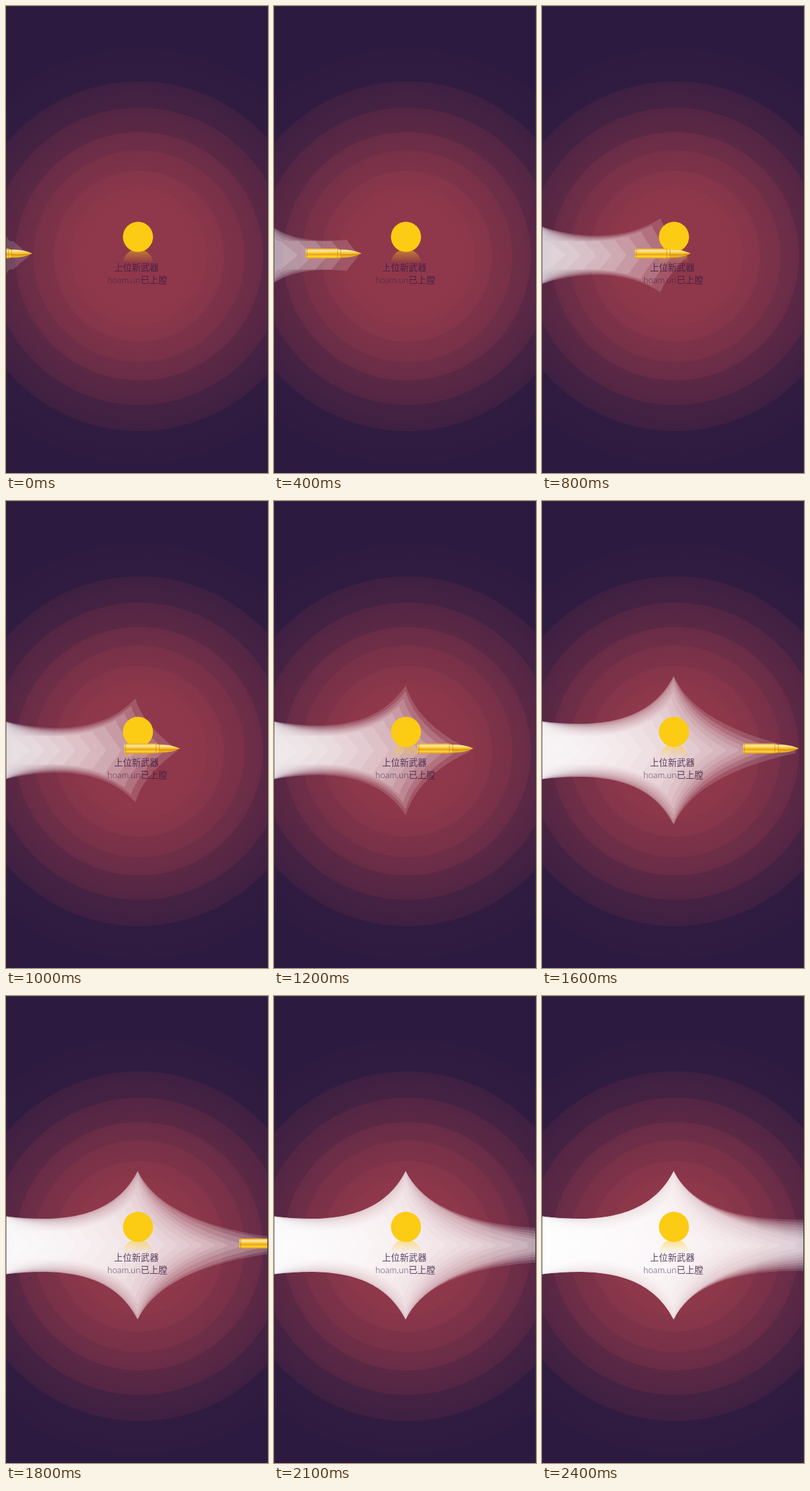
Animation, 400 px wide and 711 px high, one loop 2.7 s. Source, as an HTML page:

```html
<!DOCTYPE html>
<html lang="zh-CN">
<head>
<meta charset="utf-8">
<title>上位新武器</title>
<style>
  html, body { margin: 0; height: 100%; overflow: hidden; background: #2c1a40; }
  svg { display: block; width: 100vw; height: 100vh; }
  text {
    font: 300 13.6px Lato, "Noto Sans CJK SC Light", "Noto Sans CJK SC", "Noto Sans CJK", sans-serif;
    fill: #3b1c42;
    fill-opacity: .82;
    text-anchor: middle;
  }
</style>
</head>
<body>
<svg viewBox="0 0 400 711" preserveAspectRatio="xMidYMid slice">
  <defs>
    <radialGradient id="glow" gradientUnits="userSpaceOnUse" cx="203" cy="381" r="430"></radialGradient>
    <linearGradient id="gold" x2="0" y2="1">
      <stop offset="0" stop-color="#f0ae1c"/>
      <stop offset=".22" stop-color="#ffeaa4"/>
      <stop offset=".45" stop-color="#f8c838"/>
      <stop offset=".62" stop-color="#eba414"/>
      <stop offset=".8" stop-color="#ffd63c"/>
      <stop offset="1" stop-color="#e89c08"/>
    </linearGradient>
    <linearGradient id="mirror" gradientUnits="userSpaceOnUse" x1="0" y1="374" x2="0" y2="391">
      <stop offset="0" stop-color="#fcc81a" stop-opacity=".42"/>
      <stop offset="1" stop-color="#fcc81a" stop-opacity="0"/>
    </linearGradient>
  </defs>

  <rect width="400" height="711" fill="url(#glow)"/>
  <g id="trail" fill="#fff" fill-opacity=".155"></g>

  <path d="M178.5 393A23 23 0 0 1 224.5 393Z" fill="url(#mirror)"/>
  <circle cx="201.5" cy="351.5" r="23" fill="#fccb14"/>
  <text x="199" y="403">上位新武器</text>
  <text x="200.5" y="422">hoam.un已上膛</text>

  <!-- drawn with its point at the origin -->
  <g id="bullet">
    <path d="M-85 -7.5H-37L-33 -6H-30C-18 -6 -8 -3.5 0 0C-8 4 -18 6.5 -30 6.5H-33L-37 7.5H-85Z" fill="url(#gold)"/>
    <path d="M-83 -7.5V7.5M-36.5 -7V7M-31.5 -6V6.5" stroke="#b87408" stroke-opacity=".55"/>
    <path d="M-31 1C-20 2 -10 1 0 0C-8 4 -18 6.5 -31 6.5Z" fill="#b86c05" fill-opacity=".3"/>
  </g>
  <path d="M0 711V.5H399.5V711" fill="none" stroke="#3b3336" stroke-width="1"/>
</svg>

<script>
const $ = id => document.getElementById(id);
const NS = "http://www.w3.org/2000/svg";
const make = (parent, tag, attrs) => {
  const el = parent.appendChild(document.createElementNS(NS, tag));
  for (const key in attrs) el.setAttribute(key, attrs[key]);
  return el;
};
const clamp = v => Math.min(1, Math.max(0, v));
const lerp = (a, b, f) => a + (b - a) * f;
const smooth = v => { v = clamp(v); return v * v * (3 - 2 * v); };

// Background: crimson fading to violet, stepped into rings
const crimson = [144, 56, 75], violet = [44, 26, 64];
const shade = r => {
  const f = smooth((r - 80) / 265);
  return `rgb(${crimson.map((c, i) => Math.round(lerp(c, violet[i], f)))})`;
};
let inner = 0;
for (const r of [80, 104, 130, 161, 189, 226, 266, 316, 430]) {
  make($("glow"), "stop", { offset: inner / 430, "stop-color": shade(r - 8) });
  make($("glow"), "stop", { offset: r / 430, "stop-color": shade(r + 4) });
  inner = r;
}

const STEP = 100, LAST = 24, LOOP = 2700, AXIS = 379.5;

// Bullet point: even flight that slows a little past the circle
const flight = [[0, 40], [8, 227], [14, 343], [24, 589]];
function tipAt(step) {
  const i = Math.max(1, flight.findIndex(([s]) => s >= step));
  const [s0, x0] = flight[i - 1], [s1, x1] = flight[i];
  return lerp(x0, x1, (step - s0) / (s1 - s0));
}

// One sheet of smoke: left edge, swelling to a peak, narrowing to the bullet
function sheet(step) {
  const swell = smooth((step - 3) / 12), bend = swell * swell;
  const tip = tipAt(step);
  const base = 44 - 13 * 0.6 ** step;
  const peakX = 201 * Math.sin(Math.PI / 2 * clamp((step + 0.4) / 11.8));
  const peakH = lerp(22, 113, swell);
  const endX = Math.min(401, tip - 5);
  const endH = Math.max(1.5, (tip - 367) * 0.176);

  const side = sign => {
    const at = (x, h) => `${x} ${AXIS + sign * h}`;
    return {
      base: at(0, base),
      rise: at(peakX * lerp(0.28, 0.42, swell), lerp(22, 34, bend)),
      lift: at(peakX * lerp(0.66, 0.82, swell), lerp(20, 41, bend)),
      peak: at(peakX, peakH),
      fall: at(lerp(peakX, endX, 0.19), peakH * lerp(0.78, 0.32, swell)),
      end: at(endX, endH)
    };
  };
  const up = side(-1), down = side(1);
  return `M${up.base}C${up.rise} ${up.lift} ${up.peak}Q${up.fall} ${up.end}` +
    `L${down.end}Q${down.fall} ${down.peak}C${down.lift} ${down.rise} ${down.base}Z`;
}

const sheets = Array.from({ length: LAST + 1 }, (_, step) =>
  make($("trail"), "path", { d: sheet(step) }));

const start = performance.now();
function draw(now) {
  const time = Math.max(0, now - start) % LOOP;
  const step = Math.min(LAST, Math.floor(time / STEP));
  sheets.forEach((el, i) => el.setAttribute("visibility", i <= step ? "visible" : "hidden"));
  $("bullet").setAttribute("transform", `translate(${tipAt(step)} 376.8)`);
  requestAnimationFrame(draw);
}
draw(start);
</script>
</body>
</html>
```
